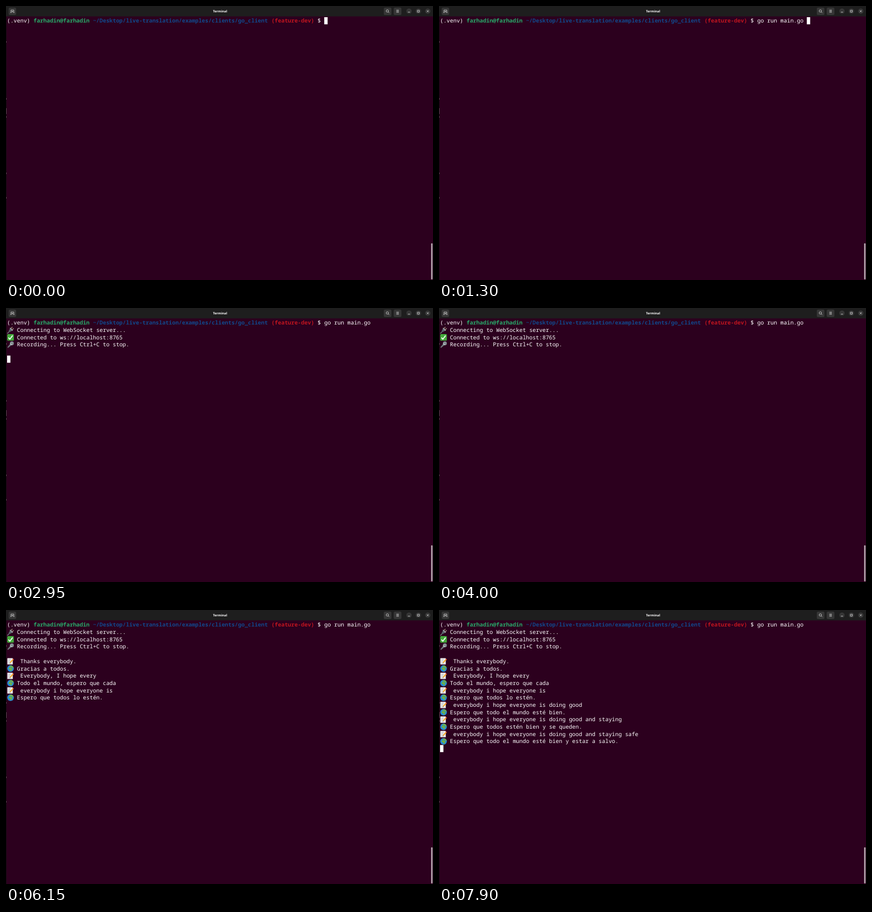
Recreate the animation shown at these times as an HTML page. Size 800 by 515 pixels, loop 8000 ms.

```html
<!DOCTYPE html>
<html lang="en">
<head>
<meta charset="utf-8">
<title>Terminal</title>
<style>
  html, body { margin: 0; width: 100%; height: 100%; overflow: hidden; background: #2c001e; }
  svg { display: block; }
  #screen text {
    font: 10.317px "Noto Sans Mono", "DejaVu Sans Mono", monospace;
    text-rendering: geometricPrecision;
    fill: #fff;
  }
  #screen text.bold { font-weight: 700; }
  #bar text {
    font: 700 6px "Noto Sans", "Open Sans", sans-serif;
    text-rendering: geometricPrecision;
    text-anchor: middle;
    fill: #fff;
  }
  #bar .button { fill: #363636; }
  #bar .glyph { fill: none; stroke: #e4e4e4; stroke-width: .8; }
</style>
</head>
<body>
<svg width="800" height="515" viewBox="0 0 800 515">
  <defs>
    <symbol id="plug" viewBox="0 0 13 13" width="13" height="13">
      <path d="M0 12.5Q2 12.5 3.8 9.2" fill="none" stroke="#7b848a" stroke-width="1.3"/>
      <path d="M2.8 8.3L5.4 3.6L9.4 7.6L4.8 10.2Z" fill="#59636a"/>
      <path d="M4.8 3.2L6.4 1.8L11.2 6.6L9.8 8.2Z" fill="#9aa3a8"/>
      <path d="M7.6 3L10 .7M10 5.4L12.4 3.1" stroke="#b9a58a" stroke-width="1.2"/>
    </symbol>
    <symbol id="check" viewBox="0 0 13 13" width="13" height="13">
      <rect x=".3" y=".3" width="12.4" height="12.4" rx="1.6" fill="#43a93b"/>
      <path d="M2.6 6.8L5.2 9.7L10.4 3" fill="none" stroke="#fff" stroke-width="1.8"/>
    </symbol>
    <symbol id="mic" viewBox="0 0 13 13" width="13" height="13">
      <path d="M6.3 4.4L8.8 6.9L1.8 12.5L.6 11.3Z" fill="#6f777c"/>
      <circle cx="9" cy="4" r="3.6" fill="#8d979c"/>
      <path d="M6 4.4L8.8 7.2" stroke="#d0d4d6" stroke-width="1.2"/>
      <path d="M7.5 2.8L10.2 5.5M9 1.6L11.4 4" stroke="#5e686d" stroke-width=".6"/>
    </symbol>
    <symbol id="memo" viewBox="0 0 13 13" width="13" height="13">
      <rect x=".5" y=".6" width="10.2" height="12" rx=".6" fill="#f1f1f1"/>
      <path d="M2 3H7.5M2 5H6.5M2 7H5M2 9H4.5M2 11H8.5" stroke="#a5abb0" stroke-width=".7"/>
      <path d="M5.1 9.9L5.6 7.7L10.6 2.3L12.2 3.9L7.2 9.2Z" fill="#f4a827"/>
      <path d="M10.2 2.7L11.3 1.5L12.9 3.1L11.8 4.3Z" fill="#e4473f"/>
      <path d="M5 10L5.3 8.7L6.3 9.6Z" fill="#4a3b35"/>
    </symbol>
    <symbol id="globe" viewBox="0 0 13 13" width="13" height="13">
      <circle cx="6.5" cy="6.5" r="6.2" fill="#2389d7"/>
      <path d="M3.3 5.2L5 4.3L8 4.9L9.5 7L10.5 7.2L8.7 9.4L7.6 11.5L6.6 11.3L6.2 8.4L3.7 8L2.7 6.6Z" fill="#72b343"/>
      <path d="M4 3.6L5.2 1.8L8 .7L11 2.5L12.3 5.4L10.7 6L8.9 4.1L6 3.4L4.6 4Z" fill="#72b343"/>
    </symbol>
  </defs>

  <rect width="800" height="515" fill="#2c001e"/>
  <path d="M.5 19V515" stroke="#150a12"/>
  <path d="M.5 66V69M.5 173V176M.5 192V203M.5 207V210M.5 313V316M.5 359V362" stroke="#55484f"/>
  <rect x="796.5" y="446" width="2.6" height="68" rx="1.3" fill="#b9adb4"/>

  <g id="bar">
    <rect width="800" height="19.5" fill="#1e1e1e"/>
    <rect class="button" x="5" y="3" width="14" height="14" rx="2.5"/>
    <path class="glyph" d="M9.3 12.3V7.7H14.7V12.3M8.3 12.3H10.2M13.8 12.3H15.7M12 9V12M10.5 10.5H13.5"/>
    <text x="401" y="11.9">Terminal</text>
    <rect class="button" x="707.8" y="3" width="14.4" height="14" rx="2.5"/>
    <circle class="glyph" cx="714.5" cy="9.3" r="2.2"/>
    <path class="glyph" d="M716.1 10.9L718 12.8"/>
    <rect class="button" x="726.4" y="3" width="14.4" height="14" rx="2.5"/>
    <path class="glyph" d="M731.3 7.8H736M731.3 9.8H736M731.3 11.8H736"/>
    <circle class="button" cx="755" cy="9.8" r="5"/>
    <path class="glyph" d="M753.2 11.5H756.8"/>
    <circle class="button" cx="772.6" cy="9.8" r="5"/>
    <rect class="glyph" x="770.9" y="8.1" width="3.4" height="3.4"/>
    <circle class="button" cx="790.2" cy="9.8" r="5"/>
    <path class="glyph" d="M788.5 8.1L791.9 11.5M791.9 8.1L788.5 11.5"/>
  </g>
  <g id="screen"></g>
</svg>

<script>
const LOOP = 8000;
const CELL = 6.19, ROW = 13.69, LEFT = 2, TOP = 21;
const INPUT_COL = 96;
const COMMAND = "go run main.go ";

const PROMPT = [
  [0, "(.venv)", "#fff"],
  [8, "farhadin@farhadin", "#29ab6a", "bold"],
  [26, "~/Desktop/live-translation/examples/clients/go_client", "#12488b", "bold"],
  [80, "(feature-dev)", "#c0141f", "bold"],
  [94, "$", "#fff"]
];

// time, row, icon, text
const OUTPUT = [
  [1650, 1, "plug", "Connecting to WebSocket server..."],
  [1750, 2, "check", "Connected to ws://localhost:8765"],
  [1750, 3, "mic", "Recording... Press Ctrl+C to stop."]
];

// time, heard phrase, translation
const PHRASES = [
  [4350, "Thanks everybody.", "Gracias a todos."],
  [5050, "Everybody, I hope every", "Todo el mundo, espero que cada"],
  [5600, "everybody i hope everyone is", "Espero que todos lo estén."],
  [6350, "everybody i hope everyone is doing good", "Espero que todo el mundo esté bien."],
  [7050, "everybody i hope everyone is doing good and staying", "Espero que todos estén bien y se queden."],
  [7750, "everybody i hope everyone is doing good and staying safe", "Espero que todo el mundo esté bien y estar a salvo."]
];

const KEYS = [150, 250, 350, 450, 550, 700, 750, 850, 900, 950, 1050, 1100, 1150, 1250, 1300];
const CURSOR_ROWS = [[0, 0], [1600, 1], [1650, 2], [1750, 5]];
const BLINKS = [1950, 2300, 2600, 2950, 3300, 3650, 4000, 4300, 4650,
  5000, 5350, 5700, 6050, 6400, 6750, 7100, 7450, 7800];

PHRASES.forEach(([time, heard, translated], i) => {
  const row = 5 + 2 * i;
  OUTPUT.push([time, row, "memo", " " + heard], [time, row + 1, "globe", translated]);
  CURSOR_ROWS.push([time, row + 2]);
});

const screen = document.getElementById("screen");
const colX = col => LEFT + col * CELL;
const rowY = row => TOP + row * ROW;

function add(parent, tag, attrs) {
  const node = document.createElementNS("http://www.w3.org/2000/svg", tag);
  for (const key in attrs) node.setAttribute(key, attrs[key]);
  return parent.appendChild(node);
}

// Each word starts on its own terminal column.
function write(parent, row, col, text, color = "#fff", weight = "") {
  for (const word of text.matchAll(/\S+/g)) {
    const node = add(parent, "text", { x: colX(col + word.index), y: rowY(row) + 10.4, class: weight });
    node.style.fill = color;
    node.textContent = word[0];
  }
}

for (const [col, text, color, weight] of PROMPT) write(screen, 0, col, text, color, weight);

const letters = [...COMMAND].map((char, i) => {
  const group = add(screen, "g", {});
  write(group, 0, INPUT_COL + i, char);
  return group;
});

const lines = OUTPUT.map(([time, row, icon, text]) => {
  const group = add(screen, "g", {});
  add(group, "use", { href: "#" + icon, x: LEFT, y: rowY(row) + .4 });
  write(group, row, 3, text);
  return { time, group };
});

const cursor = add(screen, "rect", { width: 6.3, height: 13.4, fill: "#fff" });
const show = (node, on) => node.setAttribute("visibility", on ? "visible" : "hidden");

function draw(t) {
  const typed = KEYS.filter(time => time <= t).length;
  const row = CURSOR_ROWS.filter(([time]) => time <= t).pop()[1];
  letters.forEach((group, i) => show(group, i < typed));
  lines.forEach(({ time, group }) => show(group, time <= t));
  cursor.setAttribute("x", colX(row ? 0 : INPUT_COL + typed));
  cursor.setAttribute("y", rowY(row));
  show(cursor, BLINKS.filter(time => time <= t).length % 2 === 0);
}

const start = performance.now();
function tick() {
  draw((performance.now() - start) % LOOP);
  requestAnimationFrame(tick);
}
tick();
</script>
</body>
</html>
```
